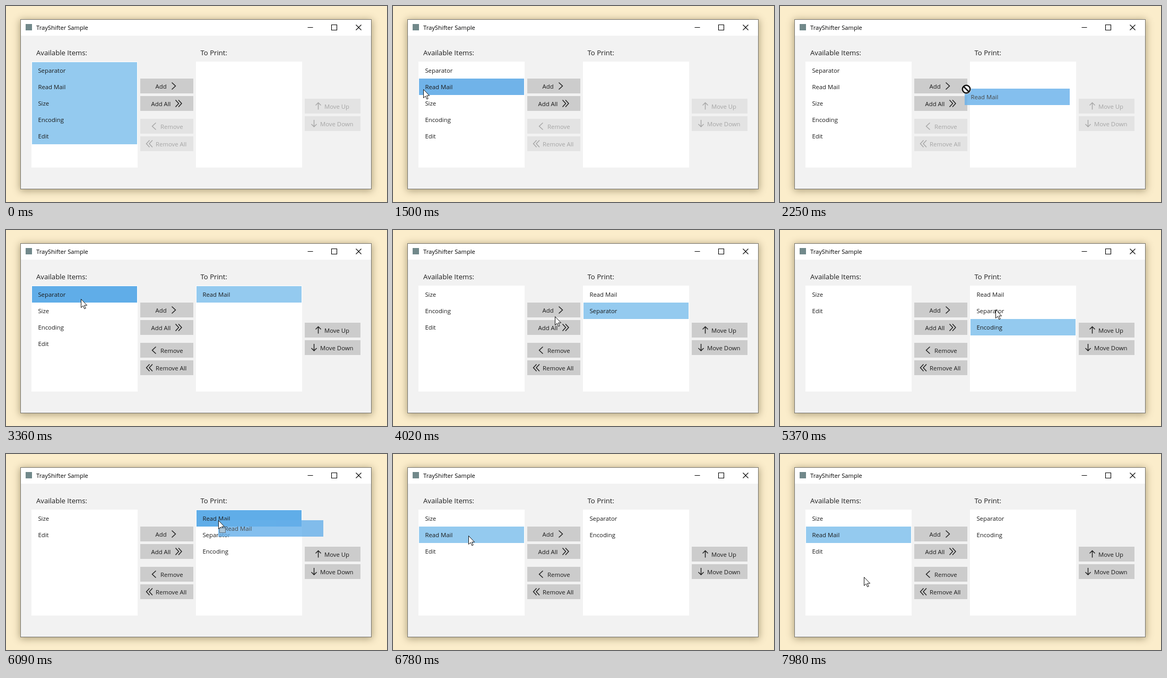
Recreate the animation shown at these times as an HTML page. Size 718 by 370 pixels, loop 8000 ms.

```html
<!DOCTYPE html>
<html lang="en">
<head>
<meta charset="utf-8">
<title>List transfer</title>
<style>
  html, body { margin: 0; width: 100%; height: 100%; overflow: hidden; background: #fbedcb; }
  #win {
    position: absolute; left: 27px; top: 25px; width: 660px; height: 319px;
    border: 1px solid #75736c; background: #f2f2f2;
    box-shadow: 0 2px 13px 1px rgba(70, 55, 20, .42);
  }
  svg { position: absolute; left: 0; top: 0; display: block; }
  text { font: 11.35px "Open Sans", "Noto Sans", sans-serif; fill: #1b1b1b; white-space: pre; }
  .head { font-size: 13.15px; }
  .title { font-size: 11.2px; fill: #000; }
  .line { fill: none; stroke: #1b1b1b; stroke-width: 1.4; }
  .off rect { fill: #e3e3e3; }
  .off text { fill: #a6a6a6; }
  .off .line { stroke: #a6a6a6; }
</style>
</head>
<body>
<div id="win"></div>
<svg id="stage" width="718" height="370" viewBox="0 0 718 370"></svg>
<script>
const LOOP = 8000, STEP = 30;
const ROW_H = 31, ROW_W = 198, LIST_Y = 106, LIST_X = { L: 49, R: 359 };
const LIGHT = '#94caef', PRESS = '#70b3e9', STRONG = '#60ade8', GHOST = '#66b0ea';
const stage = document.getElementById('stage');

function add(parent, tag, attrs, text) {
  const el = document.createElementNS('http://www.w3.org/2000/svg', tag);
  for (const k in attrs) el.setAttribute(k, attrs[k]);
  if (text) el.textContent = text;
  parent.appendChild(el);
  return el;
}
const rect = (p, x, y, width, height, fill) => add(p, 'rect', { x, y, width, height, fill });
const label = (p, x, y, text, cls = '') => add(p, 'text', { x, y, class: cls }, text);
const show = (el, on) => el.setAttribute('visibility', on ? 'visible' : 'hidden');

// Title bar
rect(stage, 28, 26, 660, 30, '#fff');
rect(stage, 37, 34, 12, 12, '#71898b');
label(stage, 57, 45, 'TrayShifter Sample', 'title');
add(stage, 'path', {
  d: 'M568.5 40.5h10M613.5 35.5h10v10h-10zM659.5 35.5l10 10M669.5 35.5l-10 10',
  fill: 'none', stroke: '#000', 'stroke-width': 1.1
});

// Lists
label(stage, 57, 93, 'Available Items:', 'head');
label(stage, 366.5, 93, 'To Print:', 'head');
for (const side of 'LR') rect(stage, LIST_X[side] - 1, LIST_Y - 1, 200, 200, '#fff');

function makeRow(parent) {
  const g = add(parent, 'g', {});
  return { g, box: rect(g, 0, 0, ROW_W, ROW_H, LIGHT), text: label(g, 11.4, 20, '') };
}
const rows = {};
for (const side of 'LR') {
  rows[side] = [0, 1, 2, 3, 4].map(i => {
    const row = makeRow(stage);
    row.g.setAttribute('transform', `translate(${LIST_X[side]} ${LIST_Y + i * ROW_H})`);
    return row;
  });
}

// Buttons: x, y, width, text x, text, icon path relative to y
function button(x, y, w, tx, text, icon) {
  const g = add(stage, 'g', {});
  rect(g, x, y, w, 28, '#ccc');
  label(g, tx, y + 19, text);
  add(g, 'path', { d: icon, transform: `translate(0 ${y})`, class: 'line' });
  return g;
}
button(253, 137, 100, 281.5, 'Add', 'M312.5 7.5l7 6.5l-7 6.5');
button(253, 170, 100, 273.5, 'Add All', 'M319.5 7.5l6 6.5l-6 6.5M325 7.5l6 6.5l-6 6.5');
const gated = [
  button(253, 213, 100, 291, 'Remove', 'M282.5 7.5l-7 6.5l7 6.5'),
  button(253, 246, 100, 282, 'Remove All', 'M270.5 7.5l-6 6.5l6 6.5M276 7.5l-6 6.5l6 6.5'),
  button(563, 175, 105, 600, 'Move Up', 'M588.5 20.5v-13M583.5 12.5l5-5l5 5'),
  button(563, 208, 105, 592, 'Move Down', 'M580.5 7v13M575.5 15l5 5l5-5')
];

// Dragged row and pointer
const ghost = makeRow(stage);
ghost.g.setAttribute('opacity', .8);
ghost.box.setAttribute('fill', GHOST);
const pointer = add(stage, 'g', {});
const arrow = add(pointer, 'path', {
  d: 'M.5 .5v16l3.7-3.4l2.6 5.7l2.4-1l-2.6-5.6h5z',
  fill: '#fff', stroke: '#111', 'stroke-width': 1
});
const badge = add(pointer, 'rect', {
  x: 2.5, y: 14.5, width: 11, height: 9, fill: '#a9c4d8',
  stroke: '#222', 'stroke-dasharray': '1 1'
});
const banned = add(pointer, 'g', { transform: 'translate(3 1)' });
add(banned, 'circle', { r: 7.3, fill: '#fff', stroke: '#fff', 'stroke-width': 4 });
add(banned, 'path', {
  d: 'M-7.3 0a7.3 7.3 0 1 0 14.6 0a7.3 7.3 0 1 0 -14.6 0M-5 -5L5 5',
  fill: 'none', stroke: '#181818', 'stroke-width': 2.7
});

// Each scene: start, left items, right items, selection { side + row: colour }, dragged item
const SEP = 'Separator', MAIL = 'Read Mail', SIZE = 'Size', ENC = 'Encoding', EDIT = 'Edit';
const all = [SEP, MAIL, SIZE, ENC, EDIT];
const four = [SEP, SIZE, ENC, EDIT], three = [SIZE, ENC, EDIT], two = [SIZE, EDIT];
const scenes = [
  [0, all, [], { L0: LIGHT, L1: LIGHT, L2: LIGHT, L3: LIGHT, L4: LIGHT }],
  [1290, all, [], { L1: PRESS }],
  [1620, all, [], {}, MAIL],
  [2580, four, [MAIL], { R0: LIGHT }],
  [3270, four, [MAIL], { L0: STRONG, R0: LIGHT }],
  [3450, four, [MAIL], {}, SEP],
  [3900, three, [MAIL, SEP], { R1: LIGHT }],
  [4170, three, [MAIL, SEP], { L1: STRONG, R1: LIGHT }],
  [4260, three, [MAIL, SEP], {}, ENC],
  [4740, two, [MAIL, SEP, ENC], { R2: LIGHT }],
  [5790, two, [MAIL, SEP, ENC], { R0: STRONG }],
  [6090, two, [MAIL, SEP, ENC], { R0: STRONG }, MAIL],
  [6120, two, [MAIL, SEP, ENC], {}, MAIL],
  [6720, [SIZE, MAIL, EDIT], [SEP, ENC], { L1: LIGHT }]
];

// Pointer stops: time, x, y
const path = [
  [510, 130, 336], [1260, 57, 157], [1590, 57, 157], [2430, 387, 155.9], [2640, 387, 155.9],
  [3270, 141, 130], [3390, 141, 130], [3810, 392, 166], [3930, 392, 166],
  [4170, 118, 156], [4230, 118, 156], [4560, 398, 179], [4770, 398, 179],
  [5340, 406, 150], [5760, 397, 121], [5970, 397, 121], [6090, 400, 125],
  [6600, 142, 154], [6780, 142, 154], [7950, 158, 232]
];

function pointAt(t) {
  const i = path.findIndex(p => p[0] > t);
  if (i < 0) return path[path.length - 1].slice(1);
  if (i === 0) return path[0].slice(1);
  const [t0, x0, y0] = path[i - 1], [t1, x1, y1] = path[i];
  const u = (t - t0) / (t1 - t0), s = u * u * (3 - 2 * u);
  return [Math.round(x0 + (x1 - x0) * s), Math.round(y0 + (y1 - y0) * s)];
}

const overList = (x, y) => y >= 105 && y < 305 &&
  Object.values(LIST_X).some(left => x >= left - 1 && x < left + 199);

let current = null;
function setScene(scene) {
  if (scene === current) return;
  current = scene;
  const [, left, right, picked, dragged] = scene;
  const items = { L: left, R: right };
  for (const side of 'LR') {
    rows[side].forEach((row, i) => {
      const fill = picked[side + i];
      row.text.textContent = items[side][i] || '';
      row.box.setAttribute('fill', fill || 'none');
    });
  }
  gated.forEach(g => g.setAttribute('class', right.length ? '' : 'off'));
  ghost.text.textContent = dragged || '';
  show(ghost.g, dragged);
}

function draw(ms) {
  const t = Math.floor(ms % LOOP / STEP) * STEP;
  let scene = scenes[0];
  for (const s of scenes) if (s[0] <= t) scene = s;
  setScene(scene);
  const [x, y] = pointAt(t), dragging = !!scene[4], allowed = overList(x, y);
  const move = `translate(${x} ${y})`;
  ghost.g.setAttribute('transform', move);
  pointer.setAttribute('transform', move);
  pointer.setAttribute('display', t < path[0][0] ? 'none' : 'inline');
  show(arrow, !dragging || allowed);
  show(badge, dragging && allowed);
  show(banned, dragging && !allowed);
}

let start = null;
function tick(now) {
  if (start === null) start = now;
  draw(now - start);
  requestAnimationFrame(tick);
}
draw(0);
requestAnimationFrame(tick);
</script>
</body>
</html>
```
